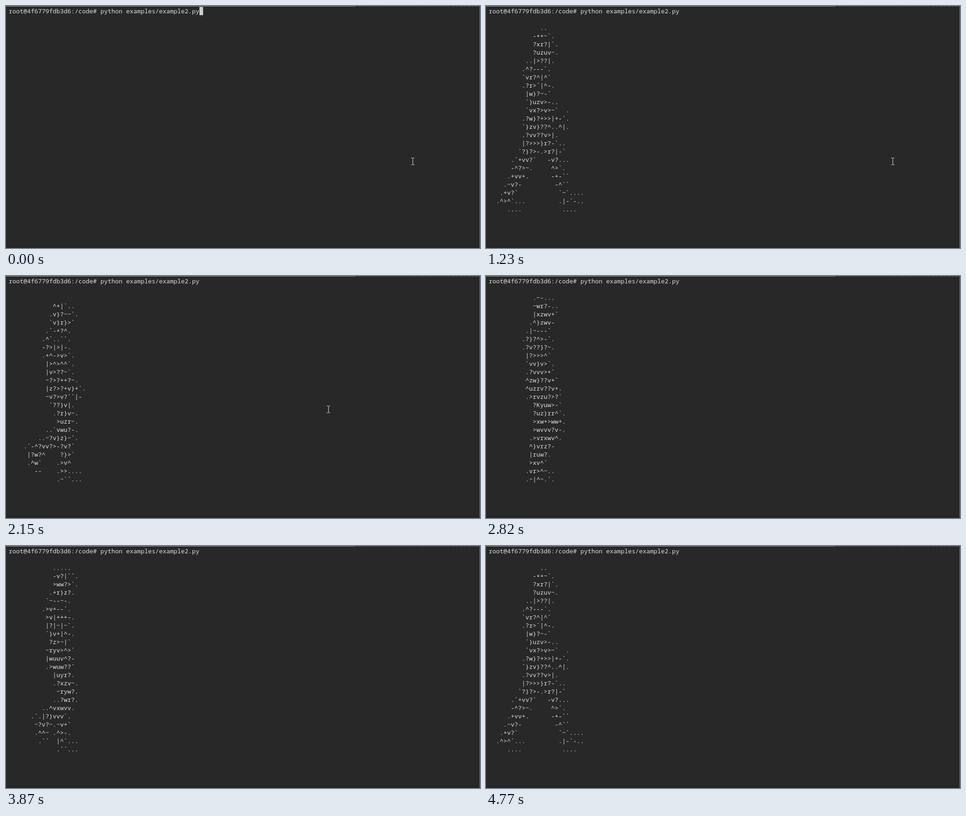
Write an HTML page that moves like this. It is 1034x528 px and loops after 4.8 s.

```html
<!DOCTYPE html>
<html lang="en">
<head>
<meta charset="utf-8">
<title>Walking figure in a terminal</title>
<style>
html, body { margin: 0; width: 100%; height: 100%; overflow: hidden; background: #282828; }
svg { display: block; }
text { font: 13.3333px "Noto Sans Mono", "DejaVu Sans Mono", monospace; fill: #dedede; white-space: pre; }
</style>
</head>
<body>
<svg id="stage" width="1034" height="528" viewBox="0 0 1034 528">
  <rect width="1034" height="528" fill="#282828"/>
  <rect y="523" width="1034" height="5" fill="#252525"/>
  <rect width="761" height="1" fill="#9a9a9a"/>
  <path d="M761 .5H1034" stroke="#6c6c6c" stroke-dasharray="3 1 1 2 5 1 2 2"/>
  <rect x="1033" width="1" height="528" fill="#757575"/>
  <text x="6" y="16">root@4f6779fdb3d6:/code# python examples/example2.py</text>
  <rect id="caret" x="422" y="2" width="8" height="18" fill="#cccccc"/>
  <g id="figure"></g>
  <path id="mouse" d="M-3 -7.5H0M1 -7.5H4M.5 -7V7M-3 7.5H0M1 7.5H4" fill="none" stroke="#e4e4e4"/>
</svg>
<script type="text/plain" id="poses">
              ..
            -++~`.
            ?xr?|`.
            ?uzuv~.
          ..|>??|.
         .^?---`.
         `vr?^|^`
         .?r>`|^-.
          |w}?~-`
          `}uzv>-..
          `vx?>v>~`  .
         .?w}?+>>|+-`.
         `}zv}??^..^|.
         .?vv??v>|.
         |?>>>}r?-`..
        `?}?>-.>r?|-`
      .`+vv?`   -v?...
      -^?>~.     ^>`.
     .+vv+.      -+-``
    .~v?-         -^``
   .+v?`           `~`....
  .^>^`...         .|-`-..
     ....           ....
%

            .^+~`..
            >xr?|`.
            ?uzrv~.
          ..~>??^.
         .-?~--`.
         `vr>^|^`
         .?v>~|^-.
          |w}>~-`
          `}uz?>-`.
          `vx?>v>~`
          ?w}?+>>|+`.
          `}wv}?^`.~`
         .?vuv?v?|.
         .?v?>}rv>`.
        .>}v>^+zr?-.
      ..^vv?~. ?v?`.
     .~?vv^.   -v?`
    .|?v?`      >>~.
   .~vv^.       ^>-`
   `?v|         |>`...
   -??`         -^~-...
    ..           ....
%
             ...
            ~v>|`..
            >wr?|`.
           .?rzz?-.
          .`|+>+|.
         .^>~--`.
         ~v?|^|^.
         .?v>|+^-.
          |w}>+~`
          `}zv>^-.
          `vy}>?>~`
          |wu}?+?>-.
          .>wuv??`
          .>uuv?>`
          .~?rzr?`.
          `>vrzwv-.
         .^vv?vyv~.
       .-?vv>`>v?`
    ..~?vv?~. ~v>`
    -?vv>-    -?>.
    `>w>.     ->^`
     ~?^.     `>>`...
      ``       ``....
%
            .....
            -v?|``.
            >ww?>`.
           .+r}z?.
          `~--~-.
         .>v+--`.
          >v|+++-.
          |?|~|~`.
          `}v+|^-.
           ?z>~|`
          ~ryv>^>`
          |wuuv^?-
          .>wuw??`
            |uyr?.
            .?xzv~.
             ~ryw?.
            ..?wr?.
         ..^vxwvv.
      .`.|?}vvv`.
       ~?v?~.~v+`
       .^^~ .^>-.
        .``  |^`...
             .``...
%
            .~-...
            ~wr?-..
            |xzwv+`
           .^}zwv-
          .|~---`
         .?}?^>-`.
         .?v??}?~.
          |?>>>^`
          `vv}v>`.
          .?vvv>+`
          ^zw}??v+`
          ^uzrv??v+.
          .>rvzu?>?`
            ?Kyuw>-`
            ?uz}rr^`.
            >xw+>ww+.
            >wvvv?v-.
           .>vrxwv^.
           ^}vrz?-
           |ruw?.
           >xv^`
          .vr>^~..
          .~|^~.`.
%
             `-`..
            -v}?~`.
            >xrr?~.
            >yzuv-.
          ..|+>+|`
         .>?~--`.
         `vv?>>^`
         .?v>>?>~.
          |v}?>^`
          `vvv?>-.
          ^vw}>??-.
         .?w}??v}?~.
         .>zv?v?`~|`
          ~vwv?r?~.
          |vu}?vr?`.
          >vu?~~?rv-.
         .?xv^. `?v?`
         ~vv>`   `vv~.
        `?v>.     ?v^`
        >v?`      -?>`..
       ~v?.        ^>|...
      .?v>-..      `-``.
      .~|^`..
%

            .-+~`..
            ~xv?|`.
            >uzrv~.
          ..~>??|.
         .>?~--`.
         `vv>^>^`
         .?}>|>^-.
          |w}?>~`
          `}vv>+-..
          ~vx?>v>~`.
         .?w}?+?v|+~`.
         `}zv}?>^..^~`
         .?vv??v>|.
         ~v?>>}r?-..
        .>}?>~.>r?|~.
       .^vv?`  .-v?`.
      .~?v>.     ~v?`
     .|vv~.       >>~.
    .~v?-         `>^`
   .+v?`           -^`....
  `^>^`...         .~-`-...
     ....           ....
%

            .~+~`..
            >v}?|`.
           .>rzr?-.
          .`|+>+^.
         .~>~..`.
         `?v>^|^`
         .?v>~|^-.
          |?}>>~`
          `vv?>^-..
          ~v?>++>~`
         .>w}>?+v>|-`.
          ~vv?v?~..~`
          `?v}vv?~.
          ~?v}rr?-.
         .>vr?vzv?`
        .^vv>-`?r?-
      .`?vv>`  -vv`
     .^vv>.    .?v~.
    .~vv^      `?>`
    ~?v`       ->^.
   .>w?        ~>-....
    ^+`        .~``...
     .          ...
%

            ^+|`..
           .v}?~~`.
           `v}r}>`
          .`-+?^.
         .^`..``.
         -?>|>|-.
         .+^->v>`.
          |>^>^^`.
          |v>??~`.
          ~?>?++?~.
          |z?>?+v}+`.
          ~v?>v?``|-
           `??}v|.
            .?r}v~.
             >uzr~.
          ..`vwu?-.
        ..~?v}z}~`.
    .`-^?vv?>-?v?`
     |?w?^    ?}>`
     .^w`    .>v^
       --    .>>....
             .~``...
%
            ....
            ~v>|`..
            >wr?>~.
           .>rzv?-
          .`~+|+`
         .>?~--`.
         .?v+>>~.
          >?>|>^`.
          |v?>>+`
          `?vv>>-.
          ^vw?>??~.
          |zuv??v+`
          .>wvv??>-
           .?uzr?~.
            ?uz}r?`
            ~ryw?v~.
            .?wvrv^.
          ..^vxwv?-
         .~?}wvv?`
         ~vv>>v?`
         `>?~>v^.
          .`-v>~...
            .^-`...
%
             ...
            ~+^-`.
            >wr?|`.
            ?uzrv~.
          ..|>??|.
         .>?~--`.
         `vv>+|^`
         .?r>~>^-.
          |w}?>~`
          `}zv?>-.
          `vx?>v>~.
         .?wv?+>?|-`.
          >zvv??>~`-`
          ~vwv?v?~.
          |vv??}r>`.
         .?vv>+>rv~.
         ~vv?` .?r?`
        .?v?-    ~v?`
       .>v?`      ->?.
      .^v>.        ~>^`
      ~v?`         `^>`..
     .?v>`..       .~``..
     .~^-...
</script>
<script>
const LOOP = 4800;
const SAMPLE = 30;
const byId = id => document.getElementById(id);
const poses = byId('poses').textContent.split('%').map(p => p.split('\n').slice(1));

// Start time of each step; a repeated time skips a pose.
const steps = [
  30, 140, 250, 370, 480, 570, 680, 800, 910, 1020, 1110,
  1230, 1320, 1430, 1530, 1640, 1760, 1880, 1990, 2110, 2210, 2320,
  2430, 2540, 2640, 2820, 2820, 2880, 2990, 3090, 3200, 3300, 3420,
  3530, 3640, 3750, 3870, 3990, 4100, 4200, 4310, 4410, 4560, 4650, 4770
];

// Pointer path: time, x, y
const path = [[0, 887, 339], [1520, 887, 339], [1610, 872, 335], [2150, 696, 289], [2610, 570, 252]];
const POINTER_END = 2640;

const rows = Array.from({ length: 23 }, (_, i) => {
  const row = document.createElementNS('http://www.w3.org/2000/svg', 'text');
  row.setAttribute('x', 6);
  row.setAttribute('y', 52 + 18 * i);
  return byId('figure').appendChild(row);
});

function show(el, on) {
  el.setAttribute('visibility', on ? 'visible' : 'hidden');
}

function pointerAt(t) {
  const i = path.findIndex(p => p[0] > t);
  if (i < 0) return path[path.length - 1].slice(1);
  const [a, b] = [path[i - 1], path[i]];
  const k = (t - a[0]) / (b[0] - a[0]);
  return [1, 2].map(n => Math.round(a[n] + (b[n] - a[n]) * k));
}

let shown;
function drawPose(step) {
  if (step === shown) return;
  shown = step;
  const pose = step < 0 ? [] : poses[step % poses.length];
  rows.forEach((row, i) => { row.textContent = pose[i] || ''; });
}

function draw(t) {
  drawPose(steps.filter(s => s <= t).length - 1);
  show(byId('caret'), t < steps[0]);
  show(byId('mouse'), t < POINTER_END);
  const [x, y] = pointerAt(Math.floor(t / SAMPLE) * SAMPLE);
  byId('mouse').setAttribute('transform', `translate(${x} ${y})`);
}

const start = performance.now();
function tick() {
  draw(Math.max(0, performance.now() - start) % LOOP);
  requestAnimationFrame(tick);
}
tick();
</script>
</body>
</html>
```
